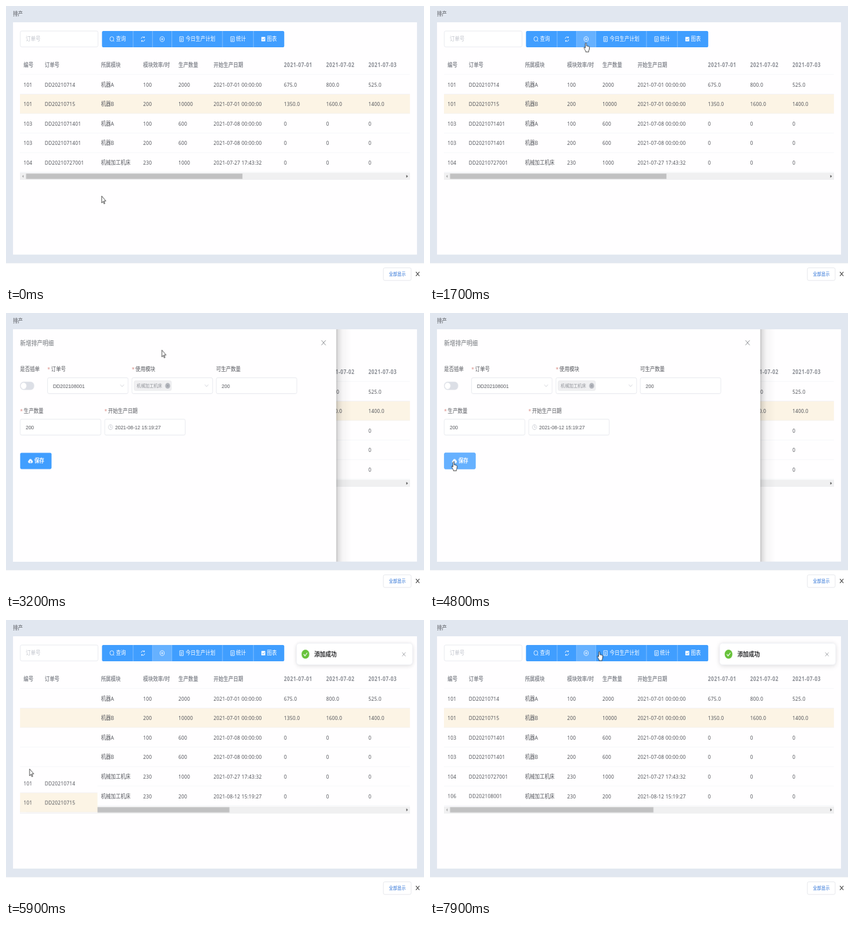
Write an HTML page that moves like this. It is 720x480 px and loops after 8 s.

```html
<!DOCTYPE html>
<html lang="zh-CN">
<head>
<meta charset="utf-8">
<title>排产</title>
<style>
html, body { margin: 0; width: 100%; height: 100%; overflow: hidden; background: #e1e7f0; }
svg { display: block; width: 720px; height: 480px; }
text { font: 14px "Noto Sans", "Noto Sans CJK SC", "Noto Sans CJK", sans-serif; fill: #54565c; white-space: pre; }
.num { letter-spacing: .25px; }
.head { font-weight: 700; fill: #8b8e95; }
.head.num { letter-spacing: .75px; }
.field text { font-family: "Liberation Sans", Arial, sans-serif; }
.field rect { fill: #fff; stroke: #dcdfe6; }
.req { fill: #d98880; }
.btn { transform: translate(.8px, .4px); }
.btn text { fill: #fff; font-weight: 500; }
.blue { fill: #409eff; }
.lit { fill: #66b1ff; }
.line { fill: none; stroke: #fff; stroke-width: 1.3; }
.thin { fill: none; stroke: #c0c4cc; stroke-width: 1.2; }
.rule { stroke: #ebeef5; }

.lit, .drawer, .toast, .cursor { animation: 8s linear infinite; }
.five, .six, .fixed, .arrow, .hand, .beam { animation: 8s step-end infinite; }
.five { animation-name: five; }
.six { animation-name: six; }
.fixed { animation-name: lag; }
.arrow { animation-name: arrow; }
.hand { animation-name: hand; }
.beam { animation-name: beam; }
.query { animation-name: query; }
.refresh { animation-name: refresh; }
.add { animation-name: add; }
.save { animation-name: save; }
.drawer { animation-name: drawer; }
.toast { animation-name: toast; }
.cursor { animation-name: cursor; }

@keyframes five { 0% { opacity: 1 } 72.75%, 100% { opacity: 0 } }
@keyframes six { 0% { opacity: 0 } 72.75%, 100% { opacity: 1 } }
@keyframes lag {
  0% { transform: none }
  72.75% { transform: translateY(208px) }
  74.75%, 100% { transform: none }
}
@keyframes query { 0%, 16.9% { opacity: 0 } 17.7% { opacity: .65 } 18.6%, 100% { opacity: 0 } }
@keyframes refresh { 0%, 17.7% { opacity: 0 } 18.9%, 19.1% { opacity: 1 } 20.4%, 100% { opacity: 0 } }
@keyframes add { 0%, 19.1% { opacity: 0 } 20.4%, 100% { opacity: 1 } }
@keyframes save { 0%, 52.6% { opacity: 0 } 53.9%, 100% { opacity: 1 } }
@keyframes drawer {
  0%, 26.27% { transform: translateX(-918.4px); opacity: 0; animation-timing-function: ease }
  30.02%, 69.5% { transform: none; opacity: 1; animation-timing-function: ease }
  73.25%, 100% { transform: translateX(-918.4px); opacity: 0 }
}
@keyframes toast {
  0%, 70.44% { transform: translateX(330px); opacity: 0; animation-timing-function: ease }
  74.19%, 100% { transform: none; opacity: 1 }
}
@keyframes cursor {
  0%, 3.75% { transform: translate(272px, 467px); animation-timing-function: ease-in-out }
  11.25%, 13.75% { transform: translate(264px, 44px); animation-timing-function: ease-in-out }
  21.25%, 41.25% { transform: translate(443px, 91px); animation-timing-function: ease-in-out }
  55.6%, 88.75% { transform: translate(67px, 366px); animation-timing-function: ease-in-out }
  97.5% { transform: translate(446px, 94px) }
  98.75%, 100% { transform: translate(481px, 78px) }
}
@keyframes arrow {
  0% { opacity: 1 } 16.9% { opacity: 0 } 26.4% { opacity: 1 } 46.1% { opacity: 0 } 47.4% { opacity: 1 }
  49.6% { opacity: 0 } 51% { opacity: 1 } 52.6% { opacity: 0 } 69.5% { opacity: 1 } 97.25%, 100% { opacity: 0 }
}
@keyframes hand {
  0% { opacity: 0 } 16.9% { opacity: 1 } 26.4% { opacity: 0 } 46.1% { opacity: 1 } 47.4% { opacity: 0 }
  52.6% { opacity: 1 } 69.5% { opacity: 0 } 97.25%, 100% { opacity: 1 }
}
@keyframes beam { 0% { opacity: 0 } 49.6% { opacity: 1 } 51%, 100% { opacity: 0 } }
</style>
</head>
<body>
<!-- Page laid out at 1188 x 686 and fitted to the stage -->
<svg viewBox="0 0 1188 685.7" preserveAspectRatio="none">
  <defs>
    <clipPath id="card"><rect x="20" y="40" width="1148" height="571"/></clipPath>
    <clipPath id="pinned"><rect x="40" y="169" width="220" height="305"/></clipPath>
    <linearGradient id="shade">
      <stop stop-opacity=".24"/>
      <stop offset=".15" stop-opacity=".12"/>
      <stop offset=".4" stop-opacity=".04"/>
      <stop offset="1" stop-opacity="0"/>
    </linearGradient>
    <g id="doc" class="line">
      <path d="M-5-6H5V6H-5ZM-2.5-2H2.5M-2.5 1H2.5M-2.5 3.5H1"/>
    </g>
    <path id="down" class="thin" d="M-5-2.5L0 2.5L5-2.5"/>
  </defs>

  <rect width="1188" height="686" fill="#e1e7f0"/>
  <text x="20" y="25">排产</text>
  <rect x="20" y="40" width="1148" height="571" fill="#fffeff"/>

  <g class="field">
    <rect x="40.5" y="61.5" width="221" height="39" rx="4"/>
  </g>
  <text x="56" y="86" style="fill:#c0c4cc">订单号</text>

  <g class="btn">
    <rect class="blue" x="272" y="61" width="518" height="40" rx="4"/>
    <rect class="lit query" x="272" y="61" width="88" height="40" rx="3"/>
    <rect class="lit refresh" x="361" y="61" width="54" height="40"/>
    <rect class="lit add" x="416" y="61" width="54" height="40"/>
    <path d="M360.5 61v40M415.5 61v40M470.5 61v40M614.5 61v40M702.5 61v40" stroke="#a6d2ff"/>
    <g class="line">
      <circle cx="300" cy="80.5" r="5.5"/>
      <path d="M304 84.5l2.5 2.5"/>
      <path d="M383.5 80a5 5 0 0 1 9-2.5v-3M393.5 82a5 5 0 0 1-9 2.5v3M392.5 77.5h-3M384.5 84.5h3"/>
      <circle cx="443" cy="81" r="6"/>
      <path d="M440 81h6M443 78v6"/>
    </g>
    <use href="#doc" x="498" y="81"/>
    <use href="#doc" x="643" y="81"/>
    <rect x="725" y="75.5" width="11" height="11" rx="1" fill="#fff"/>
    <path d="M727.5 81l2.5 2.5 4-4.5" fill="none" stroke="#409eff" stroke-width="1.3"/>
    <text x="312" y="86">查询</text>
    <text x="510" y="86">今日生产计划</text>
    <text x="653" y="86">统计</text>
    <text x="741" y="86">图表</text>
  </g>

  <g id="table"></g>

  <g clip-path="url(#card)">
    <g class="drawer">
      <rect x="938" y="40" width="44" height="571" fill="url(#shade)"/>
      <rect x="20" y="40" width="918.4" height="571" fill="#fffeff"/>
      <text x="40" y="80" style="font-size:16px;fill:#72767b">新增排产明细</text>
      <path d="M896.5 67l12 12M908.5 67l-12 12" stroke="#72767b" stroke-width="1.4"/>

      <text x="40" y="143.5">是否插单</text>
      <text x="117.5" y="143.5"><tspan class="req">*</tspan><tspan x="128">订单号</tspan></text>
      <text x="357.5" y="143.5"><tspan class="req">*</tspan><tspan x="368">使用模块</tspan></text>
      <text x="597" y="143.5">可生产数量</text>
      <text x="40" y="246"><tspan class="req">*</tspan><tspan x="50.5">生产数量</tspan></text>
      <text x="279.5" y="246"><tspan class="req">*</tspan><tspan x="290">开始生产日期</tspan></text>

      <rect x="40" y="169" width="40" height="20" rx="10" fill="#dcdfe6"/>
      <circle cx="50" cy="179" r="8" fill="#fff"/>
      <g class="field" id="fields"></g>

      <rect x="364" y="166.5" width="106" height="24" rx="4" fill="#f0f0f2" stroke="#e6e7ea"/>
      <text x="371.5" y="183" style="font-size:12px;fill:#909399">机械加工机床</text>
      <circle cx="459.5" cy="178.8" r="7" fill="#b3b6bd"/>
      <path d="M457 176.3l5 5M462 176.3l-5 5" stroke="#858890"/>
      <use href="#down" x="330" y="178.5"/>
      <use href="#down" x="570" y="178.5"/>
      <g class="thin">
        <circle cx="297" cy="280.5" r="6"/>
        <path d="M297 276.5v4.5h3"/>
      </g>

      <g class="btn">
        <rect class="blue" x="39.5" y="343" width="89" height="40" rx="4"/>
        <rect class="lit save" x="39.5" y="343" width="89" height="40" rx="4"/>
        <path d="M65 368.5a3.6 3.6 0 0 1-.5-7 4.5 4.5 0 0 1 8.5 0 3.6 3.6 0 0 1-.5 7Z" fill="#fff"/>
        <path d="M68.7 368v-4.5M66.5 365.5l2.2-2.2 2.2 2.2" fill="none" stroke="#409eff" stroke-width="1.2"/>
        <text x="80" y="368" style="font-weight:700">保存</text>
      </g>
    </g>
  </g>

  <g class="toast">
    <rect x="823" y="57" width="330" height="53" rx="8" fill="#fff" stroke="#ebeef5"
      style="filter:drop-shadow(0 2px 6px rgba(0,0,0,.14))"/>
    <circle cx="848.5" cy="84" r="11" fill="#67c23a"/>
    <path d="M843.5 84l3.7 4 6.5-7.5" fill="none" stroke="#fff" stroke-width="2"/>
    <text x="873.5" y="90" style="font-size:16px;font-weight:700;fill:#303133">添加成功</text>
    <path d="M1123.5 79.5l9.5 9.5M1133 79.5l-9.5 9.5" stroke="#909399" stroke-width="1.3"/>
  </g>

  <rect y="631" width="1188" height="56" fill="#fff"/>
  <path d="M0 631.5H1188" stroke="#d3d8df"/>
  <rect x="1072.5" y="643.5" width="79" height="31" rx="4" fill="#fff" stroke="#d8dbe0"/>
  <text x="1088" y="663.5" style="font-size:12px;fill:#2a70d6">全部显示</text>
  <path d="M1165 653.5l10 10M1175 653.5l-10 10" stroke="#555" stroke-width="2"/>

  <g class="cursor" fill="#fff" stroke="#111" stroke-width="1.2">
    <path class="arrow" d="M0 0V17L4 13.2L6.6 19.2L9 18.2L6.5 12.3H12Z"/>
    <path class="hand" d="M-1.6 12V1.4a1.6 1.6 0 0 1 3.2 0V7l2.7.4 2.7.6 2.6 1.1.6 1.6-.5 5-1.4 3v3H-.6v-2.2L-4.6 13.6-5.4 10.8-4 10.4Z"/>
    <path class="beam" d="M-3-8h6M0-8V8M-3 8h6"/>
  </g>
</svg>
<script>
const TOP = 169, ROW = 48, LEFT = 40, RIGHT = 1148, PIN = 260;
const cols = [50, 110, 270, 390, 490, 590, 790, 910, 1030];
const heads = ['编号', '订单号', '所属模块', '模块效率/时', '生产数量', '开始生产日期', '2021-07-01', '2021-07-02', '2021-07-03'];
const july = d => `2021-07-${d} 00:00:00`;
const rows = [
  [101, 'DD20210714', '机器A', 100, 2000, july('01'), '675.0', '800.0', '525.0'],
  [101, 'DD20210715', '机器B', 200, 10000, july('01'), '1350.0', '1600.0', '1400.0'],
  [103, 'DD2021071401', '机器A', 100, 600, july('08'), 0, 0, 0],
  [103, 'DD2021071401', '机器B', 200, 600, july('08'), 0, 0, 0],
  [104, 'DD20210727001', '机械加工机床', 230, 1000, '2021-07-27 17:43:32', 0, 0, 0],
  [106, 'DD202108001', '机械加工机床', 230, 200, '2021-08-12 15:19:27', 0, 0, 0]
];

const label = (x, mid, s, cls = '') =>
  `<text x="${x}" y="${mid + 5}" class="${cls} ${/\d/.test(s) ? 'num' : ''}">${s}</text>`;

// Row strip from LEFT to `right`, with the cells of columns [from, to)
function strip(cells, i, right, from, to) {
  const y = TOP + i * ROW;
  const fill = i === 1 ? '#fcf4e5' : '#fffeff';
  const body = cells.slice(from, to).map((s, k) => label(cols[from + k], y + 24, s)).join('');
  return `<g class="${i === 5 ? 'six' : ''}">
    <rect x="${LEFT}" y="${y}" width="${right - LEFT}" height="${ROW}" fill="${fill}"/>
    <path class="rule" d="M${LEFT} ${y + ROW - .5}H${right}"/>${body}</g>`;
}

const strips = (right, from, to) => rows.map((r, i) => strip(r, i, right, from, to)).join('');

const scrollbar = (y, end, cls) => `<g class="${cls}">
  <rect x="${LEFT}" y="${y}" width="${RIGHT - LEFT}" height="17" fill="#f0f0f1"/>
  <rect x="57" y="${y + 2}" width="${end - 57}" height="13" fill="#c1c1c2"/>
  <path d="M50 ${y + 5}v7l-4-3.5Z" fill="#a3a3a3"/>
  <path d="M1138 ${y + 5}v7l4-3.5Z" fill="#404040"/></g>`;

document.getElementById('table').innerHTML =
  heads.map((s, i) => label(cols[i], 144.5, s, 'head')).join('') +
  `<path class="rule" d="M${LEFT} ${TOP - .5}H${RIGHT}"/>` +
  strips(RIGHT, 2, 9) +
  scrollbar(410, 672, 'five') + scrollbar(458, 635, 'six') +
  `<g clip-path="url(#pinned)"><g class="fixed">${strips(PIN, 0, 2)}</g></g>`;

const field = (x, y, s, pad = 16) =>
  `<rect x="${x + .5}" y="${y}" width="229" height="39" rx="4"/><text x="${x + pad}" y="${y + 25}">${s}</text>`;

document.getElementById('fields').innerHTML =
  field(117.5, 159, 'DD202108001') + field(357.5, 159, '') + field(597, 159, '200') +
  field(40, 261, '200') + field(280, 261, '2021-08-12 15:19:27', 30);
</script>
</body>
</html>
```
